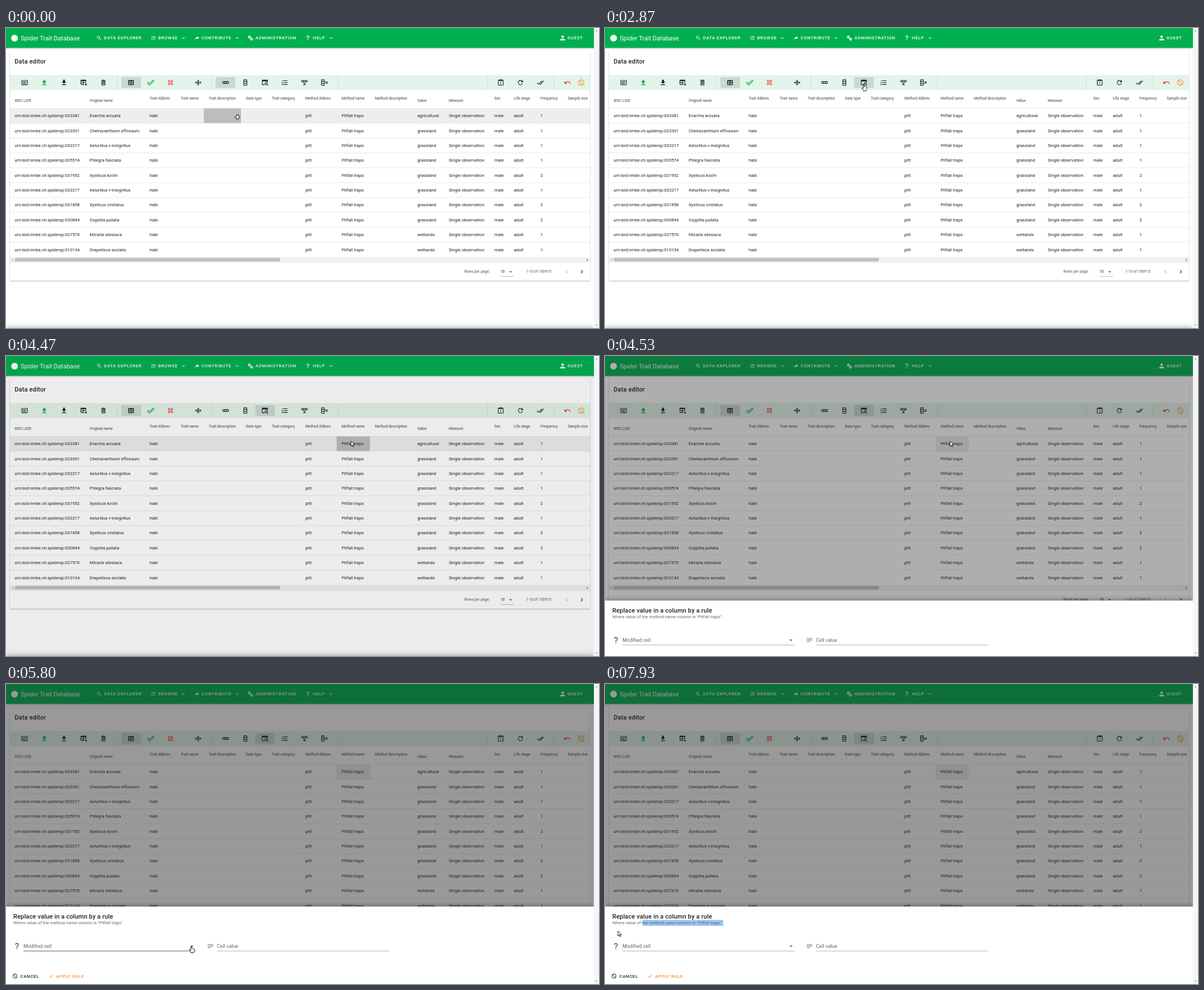
An HTML page for the animation above (8000 ms loop, 1053x532 px).

```html
<!DOCTYPE html>
<html lang="en">
<head>
<meta charset="utf-8">
<title>Data editor</title>
<style>
html, body { margin: 0; width: 100%; height: 100%; overflow: hidden; background: #fff; }
svg { display: block; width: 1053px; height: 532px; font: 7.7px Roboto, sans-serif; }
text { white-space: pre; }
path { fill-rule: evenodd; }
.btn { font-weight: 500; letter-spacing: .0893em; }
.head { font-size: 6.6px; font-weight: 500; fill: #666; }
.small { font-size: 6.6px; }
.title { font-size: 11px; font-weight: 500; letter-spacing: .0125em; }
.label { font-size: 8.8px; fill: #666; }
.card { filter: drop-shadow(0 1px 1.2px rgba(0,0,0,.3)); }
</style>
</head>
<body>
<svg id="stage" viewBox="0 0 1053 532" fill="#212121"></svg>
<script>
const LOOP = 8000, STEP = 1000 / 15;
const GREEN = '#00b050', RED = '#f44336', ORANGE = '#fb8c24', INK = '#16191b';

const ICONS = {
  card: 'M20 20H4A2 2 0 0 1 2 18V6A2 2 0 0 1 4 4H20A2 2 0 0 1 22 6V18A2 2 0 0 1 20 20M4 6V18H20V6H4M6 9H18V11H6V9M6 13H16V15H6Z',
  upload: 'M9 16V10H5L12 3L19 10H15V16H9M5 20V18H19V20Z',
  download: 'M5 20H19V18H5M19 9H15V3H9V9H5L12 16Z',
  tableX: 'M15.5 15.9L16.9 14.5L19 16.6L21.1 14.5L22.5 15.9L20.4 18L22.5 20.1L21.1 21.5L19 19.4L16.9 21.5L15.5 20.1L17.6 18ZM4 3H18A2 2 0 0 1 20 5V12.1C18.4 11.8 16.9 12.2 15.7 13H12V17H13.1Q12.9 18 13.1 19H4A2 2 0 0 1 2 17V5A2 2 0 0 1 4 3M4 7V11H10V7H4M12 7V11H18V7H12M4 13V17H10V13Z',
  trash: 'M14.1 10.5L12 12.6L9.9 10.5L8.5 11.9L10.6 14L8.5 16.1L9.9 17.5L12 15.4L14.1 17.5L15.5 16.1L13.4 14L15.5 11.9ZM15.5 4L14.5 3H9.5L8.5 4H5V6H19V4ZM6 19A2 2 0 0 0 8 21H16A2 2 0 0 0 18 19V7H6V19M8 9H16V19H8Z',
  table: 'M5 4H19A2 2 0 0 1 21 6V18A2 2 0 0 1 19 20H5A2 2 0 0 1 3 18V6A2 2 0 0 1 5 4M5 8V12H11V8H5M13 8V12H19V8H13M5 14V18H11V14H5M13 14V18H19V14Z',
  accept: 'M19.8 2.2L24 6.4L8.3 22.1L0 13.8L4.2 9.6L8.3 13.7ZM19.8 5L8.3 16.5L4.2 12.4L2.8 13.8L8.3 19.3L21.2 6.4Z',
  reject: 'M3 16.7L7.8 12L3 7.3L7.3 3L12 7.8L16.7 3L21 7.3L16.2 12L21 16.7L16.7 21L12 16.2L7.3 21ZM12 13.4L16.7 18.2L18.2 16.7L13.4 12L18.2 7.3L16.7 5.8L12 10.6L7.3 5.8L5.8 7.3L10.6 12L5.8 16.7L7.3 18.2Z',
  squeeze: 'M13 20V4H15V20ZM10 20V4H12V20ZM5 8L9 12L5 16V13H2V11H5ZM20 16L16 12L20 8V11H23V13H20Z',
  row: 'M22 14A2 2 0 0 1 20 16H4A2 2 0 0 1 2 14V10A2 2 0 0 1 4 8H20A2 2 0 0 1 22 10V14M4 14H8V10H4V14M10 14H14V10H10V14M16 14H20V10H16Z',
  column: 'M8 2H16A2 2 0 0 1 18 4V20A2 2 0 0 1 16 22H8A2 2 0 0 1 6 20V4A2 2 0 0 1 8 2M8 10V14H16V10H8M8 16V20H16V16H8M8 4V8H16V4Z',
  rule: 'M21 12V5A2 2 0 0 0 19 3H4A2 2 0 0 0 2 5V18A2 2 0 0 0 4 20H10.5V18H4V8H19V11ZM18.7 12.3A4.5 4.5 0 1 0 17.9 19.3L21 22.4L22.4 21L19.3 17.9A4.5 4.5 0 0 0 18.7 12.3M17.3 17.3A2.5 2.5 0 1 1 17.3 13.7A2.5 2.5 0 0 1 17.3 17.3',
  numbers: 'M7 13V11H21V13ZM7 19V17H21V19ZM7 7V5H21V7ZM3 8V5H2V4H4V8ZM2 17V16H5V20H2V19H4V18.5H3V17.5H4V17ZM2 10H5V11.2L3.1 13H5V14H2V13.1L4 11H2Z',
  rowX: 'M9.4 13L12 15.6L14.6 13L16 14.4L13.4 17L16 19.6L14.6 21L12 18.4L9.4 21L8 19.6L10.6 17L8 14.4ZM22 9A2 2 0 0 1 20 11H4A2 2 0 0 1 2 9V6A2 2 0 0 1 4 4H20A2 2 0 0 1 22 6V9M4 9H8V6H4V9M10 9H14V6H10V9M16 9H20V6H16Z',
  columnX: 'M4 2H11A2 2 0 0 1 13 4V20A2 2 0 0 1 11 22H4A2 2 0 0 1 2 20V4A2 2 0 0 1 4 2M4 10V14H11V10H4M4 16V20H11V16H4M4 4V8H11V4H4M17.6 12L15 9.4L16.4 8L19 10.6L21.6 8L23 9.4L20.4 12L23 14.6L21.6 16L19 13.4L16.4 16L15 14.6Z',
  clipboard: 'M19 3H14.8A3 3 0 0 0 9.2 3H5A2 2 0 0 0 3 5V19A2 2 0 0 0 5 21H19A2 2 0 0 0 21 19V5A2 2 0 0 0 19 3M12 3A1 1 0 0 1 12 5A1 1 0 0 1 12 3M7 7H17V5H19V19H5V5H7V7M11 9H13V13.5H11V9M11 15H13V17H11Z',
  refresh: 'M17.7 6.3A8 8 0 1 0 19.7 14H17.7A6 6 0 1 1 16.2 7.8L13 11H20V4Z',
  checkAll: 'M.4 13.4L6 19L7.4 17.6L1.8 12ZM22.2 5.6L11.7 16.2L7.5 12L6.1 13.4L11.7 19L23.7 7ZM18 7L16.6 5.6L10.2 11.9L11.7 13.3Z',
  undo: 'M12.5 8C9.9 8 7.5 9 5.6 10.6L2 7V16H11L7.4 12.4C8.8 11.2 10.5 10.5 12.5 10.5C16 10.5 19 12.8 20.1 16L22.5 15.2C21.1 11 17.2 8 12.5 8Z',
  cancel: 'M12 2A10 10 0 1 0 12 22A10 10 0 1 0 12 2M12 4A8 8 0 0 1 18.3 16.9L7.1 5.7A8 8 0 0 1 12 4M5.7 7.1L16.9 18.3A8 8 0 0 1 5.7 7.1Z',
  search: 'M9.5 3A6.5 6.5 0 0 1 14.4 13.7L14.7 14H15.5L20.5 19L19 20.5L14 15.5V14.7L13.7 14.4A6.5 6.5 0 1 1 9.5 3M9.5 5A4.5 4.5 0 1 0 9.5 14A4.5 4.5 0 1 0 9.5 5Z',
  bullets: 'M7 5H21V7H7ZM7 11H21V13H7ZM7 17H21V19H7ZM2.5 4.5H5.5V7.5H2.5ZM2.5 10.5H5.5V13.5H2.5ZM2.5 16.5H5.5V19.5H2.5Z',
  share: 'M21 11L14 4V8C7 9 4 14 3 19C5.5 15.5 9 13.9 14 13.9V18Z',
  help: 'M10 19H13V22H10V19M12 2C17.4 2.2 19.7 7.6 16.5 11.7C15.7 12.7 14.3 13.3 13.7 14.2C13 15 13 16 13 17H10C10 15.3 10 13.9 10.7 12.9C11.3 11.9 12.7 11.3 13.5 10.7C15.9 8.4 15.3 5.3 12 5A3 3 0 0 0 9 8H6A6 6 0 0 1 12 2Z',
  down: 'M7.4 8.6L12 13.2L16.6 8.6L18 10L12 16L6 10Z',
  left: 'M15.4 16.6L10.8 12L15.4 7.4L14 6L8 12L14 18Z',
  right: 'M8.6 16.6L13.2 12L8.6 7.4L10 6L16 12L10 18Z',
  menu: 'M7 10L12 15L17 10Z',
  account: 'M12 4A4 4 0 0 1 12 12A4 4 0 0 1 12 4M12 14C16.4 14 20 15.8 20 18V20H4V18C4 15.8 7.6 14 12 14Z',
  lines: 'M3 6H21V8H3ZM3 11H21V13H3ZM3 16H13V18H3Z',
  check: 'M21 7L9 19L3.5 13.5L4.9 12.1L9 16.2L19.6 5.6Z'
};
const CURSORS = {
  arrow: 'M0 0V16.5L3.9 12.8L6.4 18.5L8.8 17.5L6.4 11.8H11.7Z',
  cell: 'M-2.5-7.5H2.5V-2.5H7.5V2.5H2.5V7.5H-2.5V2.5H-7.5V-2.5H-2.5Z',
  hand: 'M-1.6 1.4Q0-.8 1.6 1.4V7Q3.4 5.6 4.6 7.6Q6.4 6.4 7.4 8.4Q9.6 7.6 10 10V14.5Q9.6 17 8.2 18.5V21H-1.6V19Q-4 16-6.2 12.2Q-5.5 9.8-3.5 11.5L-1.6 13.5Z',
  beam: 'M-3-8H3M0-8V8M-3 8H3'
};

const rect = (x, y, w, h, fill, more = '') =>
  `<rect x="${x}" y="${y}" width="${w}" height="${h}" fill="${fill}" ${more}/>`;
const text = (x, y, s, cls = '', fill = '') =>
  `<text x="${x}" y="${y}" class="${cls}" ${fill && `style="fill:${fill}"`}>${s}</text>`;
const icon = (name, x, y, fill = INK, k = .55) =>
  `<path d="${ICONS[name]}" fill="${fill}" transform="translate(${x} ${y}) scale(${k}) translate(-12 -12)"/>`;
const gear = (x, y, r) =>
  `<circle cx="${x}" cy="${y}" r="${r}" fill="none" stroke="#fff" stroke-width="1.3"/>` +
  `<circle cx="${x}" cy="${y}" r="${r + .9}" fill="none" stroke="#fff" pathLength="16" stroke-dasharray="1"/>`;

function appBar() {
  const items = [['search', 165.5, 174, 'DATA EXPLORER'], ['bullets', 262, 270.3, 'BROWSE', 315],
    ['share', 339, 347.3, 'CONTRIBUTE', 410.5], ['', 0, 443, 'ADMINISTRATION'], ['help', 536, 545, 'HELP', 577]];
  return rect(0, 0, 1044, 35.2, GREEN, 'class="card"') +
    '<circle cx="15.2" cy="18" r="6" fill="#fff"/>' + text(26.3, 21.5, 'Spider Trait Database', '', '#fff').replace('class=""', 'font-size="11"') +
    items.map(([name, x, tx, label, arrow]) =>
      (name && icon(name, x, 17.7, '#fff', .4125)) + text(tx, 20.4, label, 'btn', '#fff') +
      (arrow ? icon('down', arrow, 17.7, '#fff', .45) : '')).join('') +
    gear(432.2, 16, 1.5) + gear(436, 19.8, 1.5) +
    icon('account', 988.5, 17.6, '#fff') + text(997, 20.4, 'GUEST', 'btn', '#fff');
}

function toolbar() {
  const tools = [['card', 33], ['upload', 68, GREEN], ['download', 103], ['tableX', 138], ['trash', 173],
    ['table', 222], ['accept', 257, GREEN], ['reject', 292, RED], ['squeeze', 341], ['row', 390],
    ['column', 425], ['rule', 460], ['numbers', 495], ['rowX', 530], ['columnX', 565.3],
    ['clipboard', 878.5], ['refresh', 913.5], ['checkAll', 949], ['undo', 997, RED], ['cancel', 1021.5, ORANGE]];
  const button = (x, id) => rect(x - 17.5, 87, 35, 19.6, '#000', `rx="2" opacity=".11" id="${id}"`);
  return rect(7, 83.4, 1030, 26.8, '#e3f4ea') +
    button(222.3, 'tableBg') + button(389.8, 'rowBg') + button(460, 'ruleBg') +
    [197.6, 365.6, 589.8, 854.5, 972.8].map(x => rect(x, 83.4, .6, 26.8, '#c3d2ca')).join('') +
    tools.map(([name, x, fill]) => icon(name, x, 96.8, fill)).join('');
}

const COLS = [['WSC LSID', 15.3, 1], ['Original name', 148.6, 1], ['Trait Abbrev.', 255], ['Trait name', 310.3],
  ['Trait description', 360], ['Data type', 426], ['Trait category', 472], ['Method Abbrev.', 531.5],
  ['Method name', 596], ['Method description', 655], ['Value', 730.4, 1], ['Measure', 786.3, 1],
  ['Sex', 867], ['Life stage', 901.7], ['Frequency', 949], ['Sample size', 997.5]];
const ROWS = ['033381 Evarcha arcuata', '023301 Cheiracanthium effossum', '032217 Aelurillus v-insignitus',
  '035574 Phlegra fasciata', '031952 Xysticus kochi', '032217 Aelurillus v-insignitus',
  '031858 Xysticus cristatus', '030894 Ozyptila pullata', '027570 Micaria silesiaca', '010134 Drapetisca socialis'];

function table() {
  const body = ROWS.map((row, i) => {
    const y = 142.4 + 26.37 * i;
    const value = i ? i < 8 ? 'grassland' : 'wetlands' : 'agricultural';
    const cells = ['urn:lsid:nmbe.ch:spidersp:' + row.slice(0, 6), row.slice(7), 'habi', , , , , 'pitt', 'Pitfall traps', ,
      value, 'Single observation', 'male', 'adult', [4, 6, 7].includes(i) ? 2 : 1];
    return rect(7, y - .3, 1030, .6, '#dcdcdc') +
      cells.map((s, c) => text(COLS[c][1], y + 15.8, s)).join('');
  });
  return rect(7, 142.4, 1030, 26.4, '#eee', 'id="hoverRow"') + rect(0, 142.4, 0, 26.4, '#bdbdbd', 'id="hoverCell"') +
    COLS.map(([s, x, low]) => text(x, low ? 131.2 : 126.6, s, 'head')).join('') + body.join('') +
    rect(7, 406, 1030, 9.5, '#f1f1f1') + rect(15.7, 407.6, 470.6, 6.4, '#c1c1c1') +
    '<path d="M12.7 409.2V412.8L10.3 411Z" fill="#a3a3a3"/><path d="M1031.3 409.2V412.8L1033.7 411Z" fill="#505050"/>' +
    rect(7, 415.5, 1030, .6, '#dcdcdc');
}

function pager() {
  return text(814, 434.4, 'Rows per page:', 'small', '#555') + text(878, 434.4, '10', 'small') +
    icon('menu', 896, 432.3, '#666') + rect(878, 440, 24.5, .6, '#949494') +
    text(923.7, 434.4, '1-10 of 106915', 'small', '#555') +
    icon('left', 995.3, 432.2, '#b5b5b5') + icon('right', 1022.5, 432.2, '#333');
}

function sheet() {
  return '<g id="sheet">' +
    rect(0, 394.7, 1044, 140, '#fff', 'style="filter:drop-shadow(0 -2px 4px rgba(0,0,0,.3))"') +
    text(13, 416.2, 'Replace value in a column by a rule', 'title') +
    rect(67, 418.3, 143, 10.7, '#99c9f7', 'id="selection"') +
    text(13, 425.6, 'Where value of the method.name column is "Pitfall traps"', '', '#666') +
    icon('help', 19.5, 464.8, '#666') + text(31, 467.7, 'Modified cell', 'label') +
    icon('menu', 330.3, 464.8, '#666') + rect(31, 473.3, 305.5, .7, '#949494', 'id="line1"') +
    icon('lines', 363.2, 464.8, '#666') + text(374.6, 467.7, 'Cell value', 'label') +
    rect(374.6, 473.3, 305.8, .7, '#949494', 'id="line2"') +
    icon('cancel', 16, 518, '#212121', .4125) + text(25.5, 520.7, 'CANCEL', 'btn') +
    icon('check', 80, 518, ORANGE, .4125) + text(89, 520.7, 'APPLY RULE', 'btn', ORANGE) + '</g>';
}

const stage = document.getElementById('stage');
stage.innerHTML = rect(0, 0, 1053, 532, '#fff') +
  rect(7, 40, 1030, 408, '#fff', 'rx="2" class="card"') + text(15.3, 63, 'Data editor', 'title') +
  toolbar() + table() + pager() + appBar() +
  `<g id="tip">${rect(386, 63.5, 148, 17.5, '#616161', 'rx="2.2" opacity=".9"')}` +
  text(394.4, 74.9, 'Use this value as rule for value change', '', '#fff') + '</g>' +
  rect(0, 0, 1044, 532, '#212121', 'id="shade"') + sheet() +
  rect(1044, 0, 9, 532, '#f5f5f5') +
  '<path d="M1046.5 6L1048.5 3.6L1050.5 6ZM1046.5 526L1048.5 528.4L1050.5 526Z" fill="#a3a3a3"/>' +
  '<path id="cursor" stroke="#000" stroke-width="1.6"/>';

const el = id => document.getElementById(id);
const set = (id, attrs) => { for (const k in attrs) el(id).setAttribute(k, attrs[k]); };
const ramp = (t, start, length) => Math.min(1, Math.max(0, (t - start) / length));

// Standard easing curve, cubic-bezier(.25, .8, .5, 1)
function ease(x) {
  let lo = 0, hi = 1;
  const at = (s, a, b) => 3 * (1 - s) ** 2 * s * a + 3 * (1 - s) * s * s * b + s ** 3;
  for (let i = 0; i < 20; i++) {
    const mid = (lo + hi) / 2;
    if (at(mid, .25, .5) < x) lo = mid; else hi = mid;
  }
  return at(lo, .8, 1);
}

// Pointer path: time, x, y
const PATH = [[0, 411, 158], [480, 411, 158], [800, 425, 138], [1130, 455, 96], [1270, 460, 94], [1400, 460.5, 103],
  [1530, 459.5, 100], [3140, 459.5, 100], [3400, 495, 112], [3700, 590, 148], [3930, 612, 152], [4400, 612, 152],
  [4460, 612.5, 151], [4660, 612.5, 151], [5000, 606, 300], [5270, 560, 435], [5500, 440, 462], [5730, 334, 467],
  [5800, 329, 465], [6860, 329, 465], [7200, 270, 442], [7460, 211, 424], [7600, 209, 424], [7730, 178, 425],
  [7800, 130, 427], [7865, 66, 431], [7930, 23, 438], [LOOP, 23, 438]];

function pointer(t) {
  const i = PATH.findIndex(p => p[0] > t);
  const [t0, x0, y0] = PATH[i - 1], [t1, x1, y1] = PATH[i];
  const k = (t - t0) / (t1 - t0);
  return [x0 + (x1 - x0) * k, y0 + (y1 - y0) * k];
}

function draw(t) {
  const [x, y] = pointer(t);
  const open = t > 4500, inGrid = t < 4500 && y > 142.4;
  const onRule = !open && y < 106.6 && Math.abs(x - 460) < 17.5;
  const onField1 = open && y > 450 && x < 337, onField2 = open && y > 450 && x > 357 && x < 680;
  const onText = open && y > 418 && y < 430 && x < 212;

  let kind = 'arrow';
  if (inGrid && t < 4460) kind = 'cell';
  else if (onRule || onField1) kind = 'hand';
  else if (onField2 || onText) kind = 'beam';
  set('cursor', { d: CURSORS[kind], fill: kind === 'beam' ? 'none' : '#fff', transform: `translate(${x} ${y}) scale(.55)` });

  const col = open ? 8 : COLS.findLastIndex(c => c[1] - 8.8 <= x);
  const left = COLS[col][1] - 8.8, right = (COLS[col + 1]?.[1] ?? 1046) - 8.8;
  set('hoverRow', { opacity: +inGrid });
  set('hoverCell', { x: left, width: right - left, opacity: +(inGrid || open), fill: open ? '#eee' : '#bdbdbd' });

  const picked = ease(ramp(t, 2440, 280));
  set('rowBg', { opacity: .11 * (1 - picked) });
  set('ruleBg', { opacity: Math.max(.11 * picked, onRule ? .045 : 0) });
  set('tip', { opacity: ramp(t, 1350, 150) * (1 - ramp(t, 2440, 150)) });

  set('shade', { opacity: .46 * ease(ramp(t, 4455, 200)) });
  set('sheet', { transform: `translate(0 ${138 * (1 - ease(ramp(t, 4467, 200)))})` });
  set('line1', { fill: onField1 ? '#212121' : '#949494' });
  set('line2', { fill: onField2 ? '#212121' : '#949494' });
  const from = t < 7600 ? 210 : Math.min(210, Math.max(66.7, x));
  set('selection', { x: from, width: 210 - from });
}

function tick(now) {
  draw(Math.floor((now % LOOP + 4) / STEP) * STEP % LOOP);
  requestAnimationFrame(tick);
}
draw(0);
requestAnimationFrame(tick);
</script>
</body>
</html>
```
